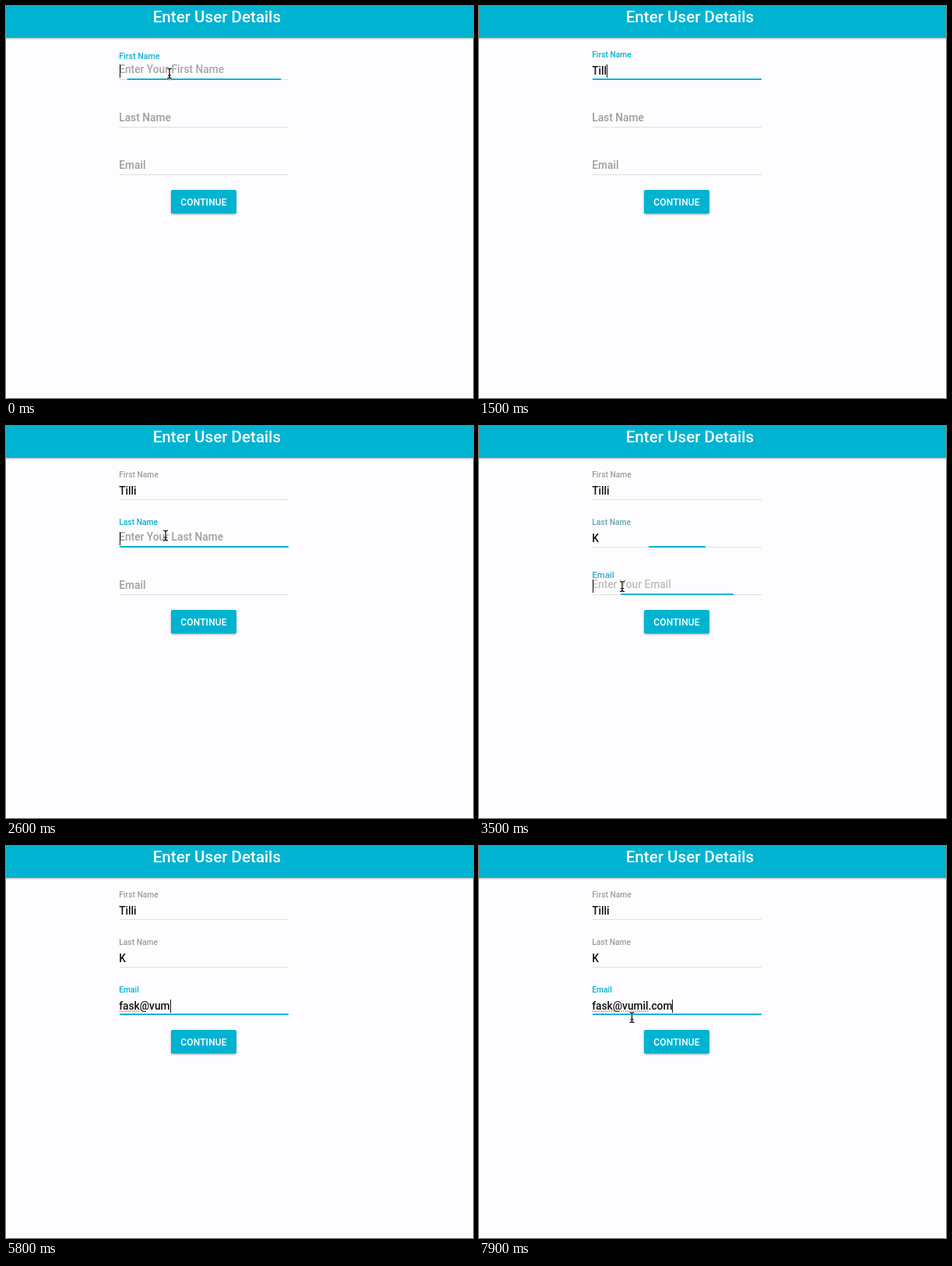
Recreate the animation shown at these times as an HTML page. Size 600 px wide and 503 px high, loop 8000 ms.

```html
<!DOCTYPE html>
<html lang="en">
<head>
<meta charset="utf-8">
<title>Enter User Details</title>
<style>
  html, body { margin: 0; width: 100%; height: 100%; overflow: hidden; background: #fdfcff; }
  svg { display: block; }
  text { font: 500 13.76px Roboto, sans-serif; }
  .header { fill: #00b3d1; filter: drop-shadow(0 1px 1.3px rgba(0, 0, 0, .28)); }
  .button { fill: #00b3d1; filter: drop-shadow(0 1.5px 1.8px rgba(0, 0, 0, .28)); }
  .title { font-size: 20.6px; fill: #fff; }
  .action { font-size: 12.05px; letter-spacing: .01em; fill: #fff; text-anchor: middle; }
  .hint { fill: #9e9e9e; }
  .value { fill: #111; }
  .rule { fill: #dedde0; }
  .active { fill: #00b3d1; }
  .caret { fill: #111; }
  .spelling { stroke: #e0524e; stroke-width: 1.6; stroke-linecap: round; stroke-dasharray: 0 2.6; }
  .halo { fill: none; stroke: #fff; stroke-width: 2.6; }
  .beam { fill: none; stroke: #000; stroke-width: 1.2; }
  .ring { fill: rgba(255, 255, 255, .3); stroke: #000; stroke-width: 1.4; }
</style>
</head>
<body>
<svg id="stage" width="600" height="503" viewBox="0 0 600 503">
  <rect class="header" x="-5" y="-5" width="610" height="46"/>
  <text class="title" x="188.7" y="20.7">Enter User Details</text>
  <rect class="button" x="212" y="236" width="84" height="30.5" rx="2"/>
  <text class="action" x="254" y="256.2">CONTINUE</text>
  <g id="fields"></g>
  <g id="pointer">
    <circle class="ring" r="14"/>
    <path class="halo" d="M-3-6.5Q0-6.5 0-4.5V4.5Q0 6.5-3 6.5M3-6.5Q0-6.5 0-4.5V4.5Q0 6.5 3 6.5M-2 2.5H2"/>
    <path class="beam" d="M-3-6.5Q0-6.5 0-4.5V4.5Q0 6.5-3 6.5M3-6.5Q0-6.5 0-4.5V4.5Q0 6.5 3 6.5M-2 2.5H2"/>
  </g>
</svg>
<script>
const LOOP = 8000, LEFT = 145.2, RULE_LEFT = 146, RULE_WIDTH = 217;
const TEAL = [0, 179, 209], GREY = [158, 158, 158];

// keys: the time at which each character of the text is typed
const fields = [
  { label: 'First Name', hint: 'Enter Your First Name', y: 94, focus: -178, blur: 2150,
    text: 'Tilli', keys: [790, 1000, 1200, 1400, 1600] },
  { label: 'Last Name', hint: 'Enter Your Last Name', y: 155, focus: 2150, blur: 3410,
    text: 'K', keys: [2800] },
  { label: 'Email', hint: 'Enter Your Email', y: 216, focus: 3410, blur: Infinity,
    text: 'fask@vumil.com',
    keys: [3700, 3800, 3900, 4000, 4800, 5600, 5700, 5800, 6000, 6200, 6600, 7000, 7400, 7600],
    misspelt: [[4800, 4], [6600, 10]] }
];

// stretches of time in which the pointer shows, with its path
const moves = [
  { show: 0, hide: 790, start: 0, end: 1, from: [210, 86.5], to: [210, 86.5] },
  { show: 1700, hide: 2800, start: 1650, end: 2000, from: [210, 86.5], to: [205, 140.5] },
  { show: 3000, hide: 3700, start: 2950, end: 3250, from: [205, 140.5], to: [184, 206] },
  { show: 7790, hide: LOOP, start: 7790, end: 7890, from: [199, 219.5], to: [196.5, 220] }
];
const clicks = [[1980, 2240], [3260, 3460]];

const clamp = v => Math.min(1, Math.max(0, v));
const mix = (a, b, p) => a + (b - a) * p;

// cubic-bezier(.25, .8, .25, 1), solved by bisection
function ease(x) {
  x = clamp(x);
  if (x === 0 || x === 1) return x;
  let low = 0, high = 1;
  for (let i = 0; i < 20; i++) {
    const s = (low + high) / 2;
    if (.75 * s * (1 - s) + s ** 3 < x) low = s; else high = s;
  }
  return 2.4 * (1 - low) ** 2 * low + 3 * (1 - low) * low ** 2 + low ** 3;
}
const transition = (t, start) => ease((t - start) / 400);

function add(parent, tag, attributes, content = '') {
  const node = document.createElementNS('http://www.w3.org/2000/svg', tag);
  set(node, attributes);
  node.textContent = content;
  return parent.appendChild(node);
}
function set(node, attributes) {
  for (const name in attributes) node.setAttribute(name, attributes[name]);
}

for (const f of fields) {
  const group = document.getElementById('fields');
  add(group, 'rect', { class: 'rule', x: RULE_LEFT, y: f.y, width: RULE_WIDTH, height: 1 });
  f.activeNode = add(group, 'rect', { class: 'active', y: f.y - 1, height: 2 });
  f.labelNode = add(group, 'text', {}, f.label);
  f.hintNode = add(group, 'text', { class: 'hint', x: LEFT, y: f.y - 8 }, f.hint);
  f.valueNode = add(group, 'text', { class: 'value', x: LEFT, y: f.y - 5.6 });
  f.spellingNode = add(group, 'line', { class: 'spelling', x1: 146.5, y1: f.y - 4, y2: f.y - 4 });
  f.caretNode = add(group, 'rect', { class: 'caret', y: f.y - 19, width: 1, height: 17 });
}

function drawField(f, t) {
  const floating = transition(t, f.focus);
  const focused = floating - transition(t, f.blur);
  const width = RULE_WIDTH * focused;
  set(f.activeNode, { x: RULE_LEFT + (RULE_WIDTH - width) / 2, width });

  const y = f.y + mix(-7.1, -28.3, floating);
  const colour = GREY.map((c, i) => Math.round(mix(c, TEAL[i], focused)));
  set(f.labelNode, {
    transform: `translate(${LEFT} ${y}) scale(${mix(1, .75, floating)})`,
    fill: `rgb(${colour})`
  });
  set(f.hintNode, { opacity: floating * (1 - transition(t, f.keys[0])) });

  const typed = f.keys.filter(k => k <= t);
  f.valueNode.textContent = f.text.slice(0, typed.length);
  const end = typed.length ? LEFT + f.valueNode.getComputedTextLength() : 145.6;
  const lastInput = typed.length ? typed[typed.length - 1] : f.focus;
  const caretOn = t >= f.focus && t < f.blur && (t - lastInput) % 1000 < 500;
  set(f.caretNode, { x: Math.round(end), opacity: caretOn ? 1 : 0 });

  const marked = (f.misspelt || []).filter(([start]) => start <= t).pop();
  set(f.spellingNode, {
    x2: marked ? LEFT + f.valueNode.getSubStringLength(0, marked[1]) : 146.5,
    opacity: marked ? 1 : 0
  });
}

function drawPointer(t) {
  const pointer = document.getElementById('pointer');
  const move = moves.find(m => t >= m.show && t < m.hide);
  set(pointer, { visibility: move ? 'visible' : 'hidden' });
  if (!move) return;
  const p = clamp((t - move.start) / (move.end - move.start));
  const eased = p * p * (3 - 2 * p);
  const [x, y] = move.from.map((v, i) => mix(v, move.to[i], eased));
  set(pointer, { transform: `translate(${x} ${y})` });
  const pressed = clicks.some(([start, end]) => t >= start && t < end);
  set(pointer.firstElementChild, { opacity: pressed ? 1 : 0 });
}

function draw() {
  const t = performance.now() % LOOP;
  fields.forEach(f => drawField(f, t));
  drawPointer(t);
  requestAnimationFrame(draw);
}
draw();
</script>
</body>
</html>
```
